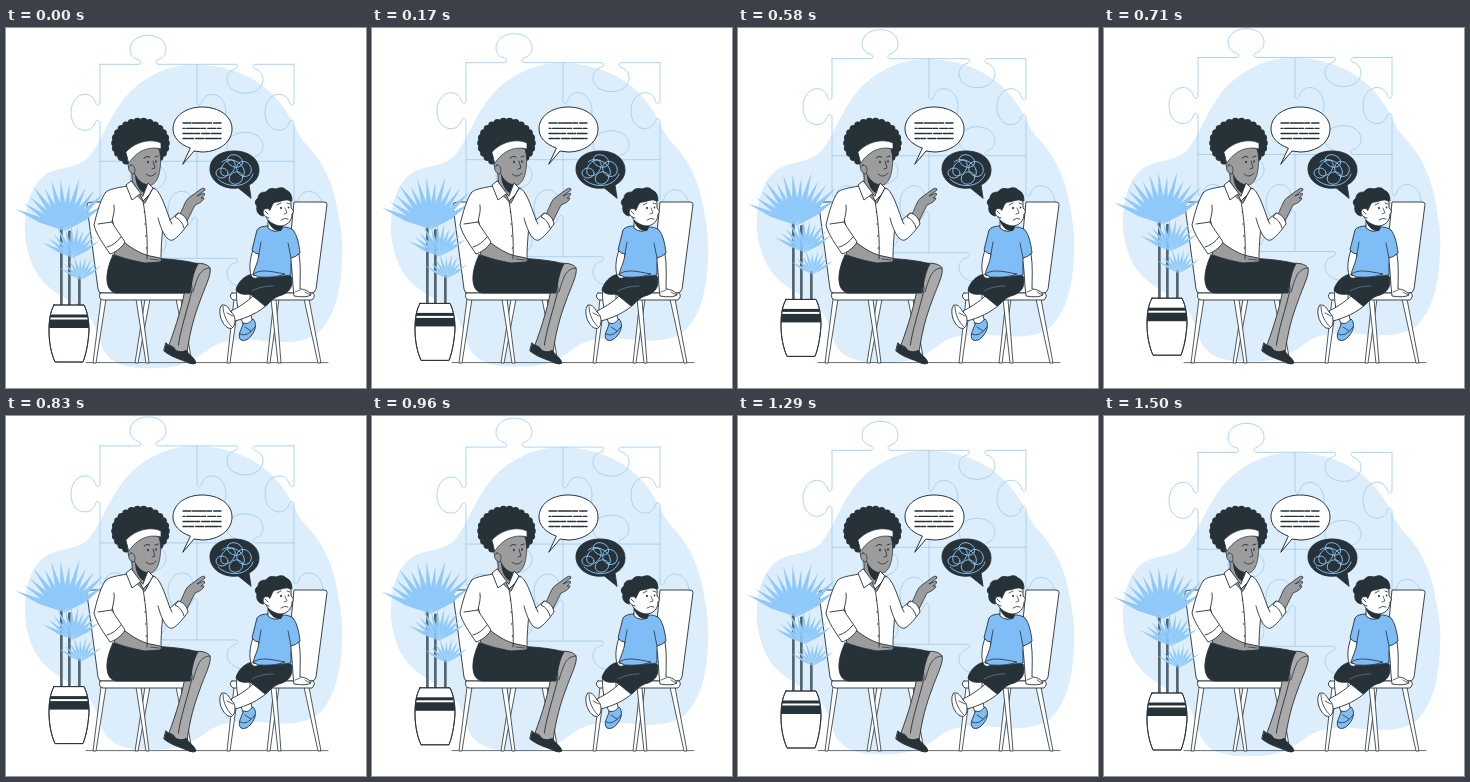
Animation, 360 px wide and 360 px high, one loop 1540 ms. Source, as an HTML page with a canvas:

```html
<!DOCTYPE html>
<html lang="en">
<head>
<meta charset="utf-8">
<title>Talking it through</title>
<style>
html, body { margin: 0; width: 100%; height: 100%; overflow: hidden; background: #fff; }
canvas { display: block; width: 360px; height: 360px; }
</style>
</head>
<body>
<canvas id="stage"></canvas>
<script>
const canvas = document.getElementById('stage');
const ctx = canvas.getContext('2d');
const ratio = window.devicePixelRatio || 1;
canvas.width = canvas.height = 360 * ratio;

const INK = '#263238', SKIN = '#9c9c9c', LEG = '#aaa', BLUE = '#7fbdf7';
const PALE = '#dcedfc', EDGE = '#a3d0f3', LEAF = '#8fc9fa', WHITE = '#fff';
const LOOP = 1540, FLOAT = 1500, STEP = 1000 / 24, RISE = 7.2;

function shape(d, fill, stroke = INK, width = 0.9) {
  const path = new Path2D(d);
  if (fill) { ctx.fillStyle = fill; ctx.fill(path); }
  if (stroke) { ctx.strokeStyle = stroke; ctx.lineWidth = width; ctx.stroke(path); }
}
const line = (d, stroke = INK, width = 0.9) => shape(d, null, stroke, width);

function oval(x, y, rx, ry, fill, stroke, turn = 0) {
  ctx.beginPath();
  ctx.ellipse(x, y, rx, ry, turn, 0, 7);
  if (fill) { ctx.fillStyle = fill; ctx.fill(); }
  if (stroke) { ctx.strokeStyle = stroke; ctx.lineWidth = 0.9; ctx.stroke(); }
}

function raised(dy, draw) {
  ctx.save();
  ctx.translate(0, -dy);
  draw();
  ctx.restore();
}

function backdrop() {
  shape('M19 195C20 176 25 158 38 148C51 138 68 142 82 130C96 115 104 83 126 62C143 46 166 36.5 187 36.5' +
    'C222 36 256 50 275 76C288 93 288 101 299 115C313 129 327 150 332 185C335 200 337 212 336 232' +
    'C335 260 330 287 313 304C296 318 270 314 248 312C228 311 213 314 203 321C191 330 176 340 153 340' +
    'C128 341 106 339 97 321C91 306 90 294 78 283C62 270 43 264 32 247C22 232 18 212 19 195Z', PALE, null);
}

// One jigsaw edge, 97 long, with its tab on the left (side 1) or right (-1).
function jigsawEdge(x, y, turn, side) {
  ctx.save();
  ctx.translate(x, y);
  ctx.rotate(turn * Math.PI / 2);
  ctx.scale(1, side);
  line('M0 0H39C42 -1 41 -4 37 -5C32 -7 30 -11 30 -15C30 -23 38 -29 48 -29' +
    'C59 -29 66 -23 66 -15C66 -11 64 -7 59 -5C55 -4 55 -1 58 0H97', EDGE, 0.9);
  ctx.restore();
}

function puzzle() {
  jigsawEdge(94, 36.3, 0, 1);
  jigsawEdge(191, 36.3, 0, -1);
  jigsawEdge(94, 36.3, 1, -1);
  jigsawEdge(191, 36.3, 1, 1);
  jigsawEdge(288, 36.3, 1, -1);
  jigsawEdge(94, 133.3, 0, -1);
  jigsawEdge(191, 133.3, 0, 1);
  jigsawEdge(94, 133.3, 1, 1);
  jigsawEdge(191, 133.3, 1, -1);
  jigsawEdge(288, 133.3, 1, 1);
  jigsawEdge(94, 230.3, 0, 1);
  jigsawEdge(191, 230.3, 0, -1);
}

// Leaves open upwards from a hub; angles are in degrees, clockwise from the right.
function fan(x, y, from, to, count, reach) {
  for (let i = 0; i < count; i++) {
    const a = (from + (to - from) * i / (count - 1)) * Math.PI / 180;
    const r = reach * (0.94 + 0.07 * Math.sin(i * 2.4 + 1));
    const c = Math.cos(a), s = Math.sin(a), mid = r * 0.5, half = reach * 0.05;
    ctx.beginPath();
    ctx.moveTo(x, y);
    ctx.lineTo(x + c * mid - s * half, y + s * mid + c * half);
    ctx.lineTo(x + c * r, y + s * r);
    ctx.lineTo(x + c * mid + s * half, y + s * mid - c * half);
    ctx.closePath();
    ctx.fillStyle = LEAF;
    ctx.fill();
  }
}

function plant() {
  for (const [x, top] of [[55.5, 200], [63.5, 204], [73.5, 250]]) {
    line(`M${x} ${top}V278`, '#455a64', 2.8);
    line(`M${x + 0.8} ${top}V278`, '#9aa3a8', 0.8);
  }
  fan(59, 203, -156, -34, 13, 54);
  fan(67, 230, -153, -33, 11, 34);
  fan(75, 252, -150, -35, 9, 25);
  const pot = 'M48 277H78C82 285 83 294 83 303C82 317 80 326 77 334H49C45 325 43 314 43 303C43 293 44 284 48 277Z';
  shape(pot, WHITE);
  ctx.save();
  ctx.clip(new Path2D(pot));
  ctx.fillStyle = INK;
  ctx.fillRect(40, 286.5, 46, 3);
  ctx.fillRect(40, 291.5, 46, 8.5);
  ctx.restore();
  line(pot);
}

function chairLeg(x0, x1) {
  shape(`M${x0} 271L${x1} 335H${x1 + 3}L${x0 + 5} 271Z`, WHITE, INK, 0.8);
}

function chairs() {
  line('M80 334.6H322', INK, 0.7);
  [[139, 129], [130, 140], [95, 87], [170, 183]].forEach(leg => chairLeg(...leg));
  [[268, 261], [265, 272], [228, 221], [298, 312]].forEach(leg => chairLeg(...leg));
  shape('M82 175Q84 174 88 174H122L130 265H95Q93 265 92 261L81 178Z', WHITE);
  shape('M94 265H184Q187 268 183 272H97Q92 271 94 265Z', WHITE);
  shape('M321 176Q321 174 318 174H288L279 265H306Q309 265 310 261Z', WHITE);
  shape('M226 265H307Q310 268 306 272H227Q222 268 226 265Z', WHITE);
}

function womanHead() {
  oval(134.5, 115, 27, 23, INK);
  for (let i = 0; i < 26; i++) {
    const a = i * Math.PI / 13;
    oval(134.5 + 25.5 * Math.cos(a), 115 + 21.5 * Math.sin(a), 3.8, 3.8, INK);
  }
  shape('M125 139C126 147 127 153 125 158L131 173L140 178L142 166L140 154L134 143Z', SKIN);
  shape('M129 145L141 157L138 165C132 162 129 154 129 145Z', INK, null);
  shape('M121 131C130 120 144 117 153 121C155 128 155 134 154 141C153 150 149 157 144 157' +
    'C137 157 131 152 128 144C123 144 122 139 122 135Z', SKIN, INK, 0.7);
  shape('M120 124C129 114 144 110 155 115L155 121C144 118 131 122 123 135Z', WHITE, INK, 0.7);
  shape('M125 137C121 138 122 145 128 146C130 142 129 137 125 137Z', SKIN, INK, 0.7);
  line('M138 130Q141 127 144 129M149 129L152 128', INK, 0.9);
  oval(142, 134, 0.9, 1.2, INK);
  oval(150, 133.5, 0.8, 1.2, INK);
  line('M147 133L149 140L146 141M140 146Q145 151 150 145', INK, 0.8);
}

function womanLegs() {
  shape('M180 255L192 252C188 270 179 300 174 322L163 317C170 298 177 276 180 255Z', LEG);
  shape('M184 236C194 234 202 236 204 240C206 246 198 261 194 273C188 289 184 303 181 325L172 320' +
    'C174 302 182 280 186 262Z', LEG);
  line('M204 240C200 240 196 242 193 247C190 253 189 258 187 264', INK, 0.8);
  shape('M160 315C165 320 173 321 180 322C183 327 189 330 190 335Q188 337 183 335C174 331 165 329 158 323Z', INK);
  shape('M164 314L181 321Q177 325 170 322Z', LEG, null);
  shape('M107 227C123 231 149 230 160 231C174 232 186 234 192 236C188 242 186 252 184 265H110' +
    'C99 263 98 246 107 227Z', INK);
}

function womanBody() {
  shape('M121 158C111 160 102 161 99 165C103 181 110 199 112 226C124 234 143 233 155 231C155 213 157 202 157 192' +
    'C154 176 151 163 147 160L139 175Z', WHITE);
  shape('M174 186C178 179 179 172 184 169L195 161Q199 159 199 162L191 168L198 165Q200 167 195 170' +
    'L198 170Q197 174 189 177C186 182 184 188 181 193Z', SKIN, INK, 0.8);
  shape('M148 160C154 163 158 175 164 192L172 185C177 186 181 190 182 196C177 203 172 209 167 212C160 214 155 201 152 190',
    WHITE);
  line('M172 185L169 189Q176 192 178 200M164 192L166 196');
  shape('M108 218L119 215C127 221 135 226 144 228L154 230Q157 232 154 234L139 235C128 233 116 230 109 227Z', SKIN);
  line('M144 231L153 232', INK, 0.7);
  shape('M100 164C95 170 91 184 88 197C90 206 98 217 104 226C108 225 116 220 119 214C114 206 109 200 106 194' +
    'C107 188 109 183 108 177', WHITE);
  line('M101 219Q109 217 115 209M92 196L106 194');
  shape('M125 153L120 157L126 172L134 166L137 173L143 167L147 160L142 155L137 168Z', WHITE);
  line('M137 173C140 190 142 212 141 231');
  for (let y = 184; y < 225; y += 12) oval(138.4 + (y - 184) / 18, y, 0.7, 0.7, INK);
}

function boyHead() {
  shape('M262 188L262 200Q269 206 276 201V194Z', WHITE);
  shape('M262 190C267 196 273 198 277 198L275 203Q267 204 262 194Z', INK, null);
  shape('M259 175C267 168 281 169 285 174L285 180Q289 183 286 186C286 193 281 198 274 198' +
    'C267 197 262 193 260 189Z', WHITE);
  shape('M257 188C252 187 250 183 251 178Q247 174 252 170Q252 164 260 164Q263 159 270 161Q277 158 280 162' +
    'Q286 164 286 173C279 170 275 174 270 174C267 174 266 178 264 182L260 183Z', INK);
  shape('M263 181C256 178 254 188 263 190', WHITE);
  line('M259 183L262 186M271 177L275 175M281 175L284 176M275 192Q279 189 282 191', INK, 0.8);
  oval(275, 180, 0.9, 1.2, INK);
  oval(282.5, 179.5, 0.8, 1.1, INK);
  line('M279 180L281 185L278 186', INK, 0.7);
}

function boyLegs() {
  shape('M231 260L244 266C244 276 244 287 247 294L238 298C233 287 229 273 231 260Z', WHITE);
  shape('M238 295C241 297 244 294 247 291C251 295 250 302 245 308Q240 314 235 312Q232 309 234 304Z', BLUE);
  line('M234 306Q241 310 249 299M239 299L245 303', INK, 0.8);
  shape('M252 263L263 275C253 285 240 290 229 293L225 283C235 278 244 272 252 263Z', WHITE);
  shape('M216 277C221 276 223 281 225 284C229 287 230 292 228 298Q226 302 222 300C216 296 213 288 214 281Z', WHITE);
  line('M217 278C217 287 221 294 226 299M221 285L227 288', INK, 0.8);
  shape('M246 246C256 249 272 247 285 248C288 257 284 264 276 267C267 269 264 275 259 278L248 269L244 266' +
    'C238 267 232 266 230 262C232 254 238 248 246 246Z', INK);
  line('M246 263C253 259 260 258 267 258', '#78909c', 0.6);
}

function boyBody() {
  shape('M247 222C243 233 243 244 246 249Q249 252 255 248L273 247L252 243L253 226Z', WHITE);
  shape('M284 229L293 226C295 238 294 250 294 261C299 261 304 264 305 267Q300 270 288 268C286 254 287 242 284 229Z',
    WHITE);
  line('M294 262L289 264M299 264L304 267', INK, 0.7);
  shape('M262 198C257 198 253 199 251 202L246 222Q249 226 253 226C252 235 248 241 247 247' +
    'C257 249 273 249 285 247L285 230Q290 229 294 225C293 216 291 207 287 202C283 199 279 199 276 199' +
    'C272 205 265 203 262 198Z', BLUE);
  line('M253 226L255 214M285 230L282 215', INK, 0.8);
  shape('M247 246C255 241 263 243 279 246Q270 250 253 249Z', BLUE, INK, 0.8);
}

function speech() {
  shape('M184 120C173 116 167 109 167 101C167 88 180 79 196 79C213 79 226 88 226 101' +
    'C226 114 213 124 196 124L188 123L177 136Z', WHITE, INK, 1);
  ctx.setLineDash([8, 1.5, 13, 1.2, 5, 2]);
  [95, 100.3, 105.5, 110.5].forEach((y, i) => {
    ctx.lineDashOffset = i * 6;
    line(`M177 ${y}H215`, INK, 1.3);
  });
  ctx.setLineDash([]);
}

function thought() {
  shape('M232 160C217 162 204 153 204 141C204 130 214 123 228 123C243 123 253 131 253 142' +
    'C253 149 249 154 243 157L245 170Z', INK);
  for (const [x, y, rx, ry, turn] of [
    [229, 133, 8, 6, 0.4], [238, 141, 8, 7, 0.9], [216, 145, 6, 5, 0], [230, 150, 7, 6, -0.5], [222, 140, 9, 6, -0.9]
  ]) oval(x, y, rx, ry, null, LEAF, turn);
  line('M212 151C222 161 242 160 247 146M216 134C224 126 244 138 237 149', LEAF, 0.9);
}

function render(now) {
  const frame = Math.floor((now % LOOP + 4) / STEP);
  const phase = frame * STEP / FLOAT % 1;
  const lift = RISE * (1 - Math.abs(1 - 2 * phase));
  ctx.setTransform(ratio, 0, 0, ratio, 0, 0);
  ctx.fillStyle = WHITE;
  ctx.fillRect(0, 0, 360, 360);
  ctx.lineJoin = ctx.lineCap = 'round';
  raised(lift, backdrop);
  raised(lift, puzzle);
  chairs();
  raised(lift, plant);
  [womanHead, womanLegs, womanBody, boyLegs, boyBody, boyHead, speech, thought].forEach(draw => draw());
}

const start = performance.now();
function tick() {
  render(performance.now() - start);
  requestAnimationFrame(tick);
}
tick();
</script>
</body>
</html>
```
